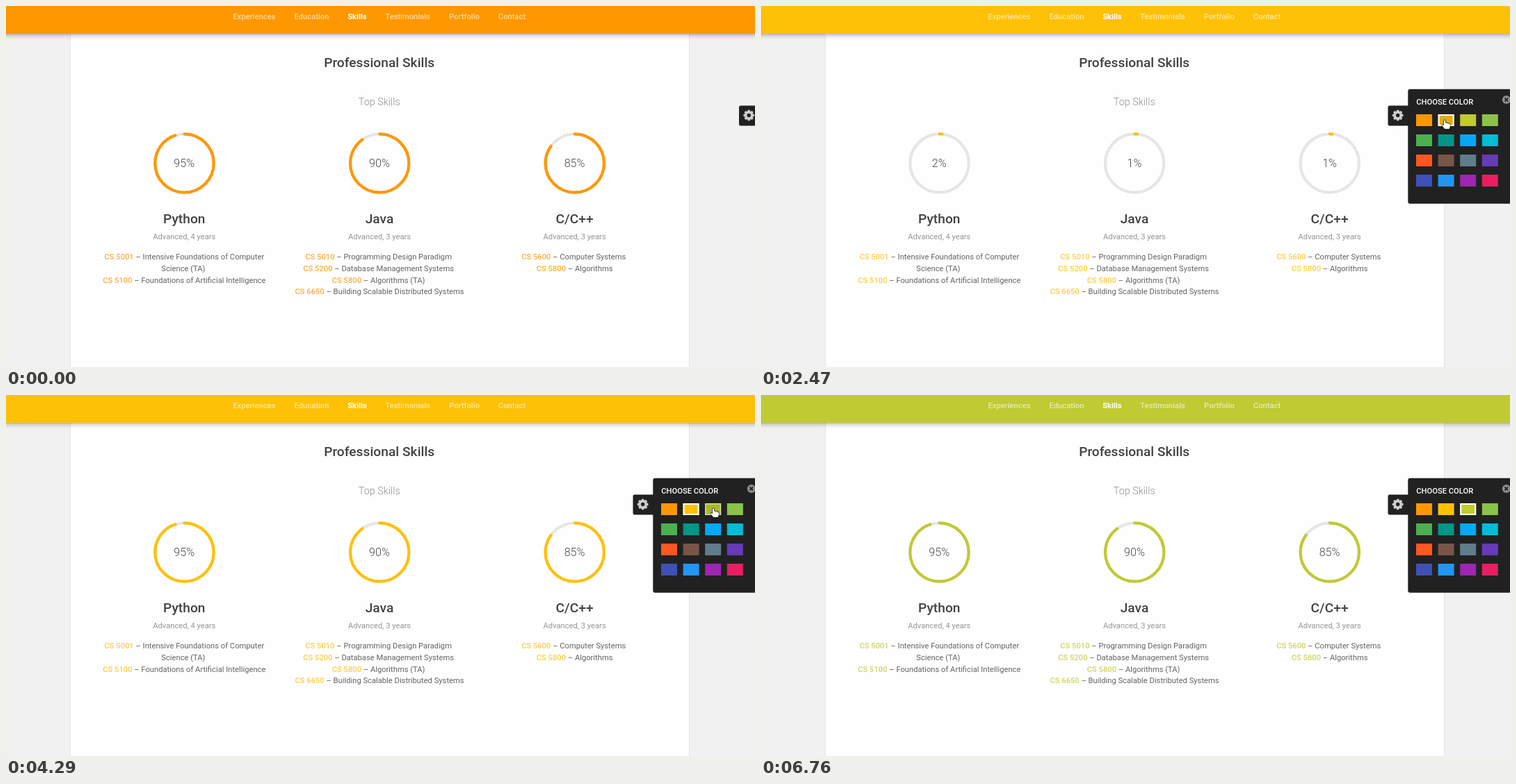
An HTML page with a canvas for the animation above (7.15 s loop, 1077 by 520 pixels).

```html
<!DOCTYPE html>
<html lang="en">
<head>
<meta charset="utf-8">
<title>Professional Skills</title>
<style>
  html, body { margin: 0; width: 100%; height: 100%; overflow: hidden; background: #f1f1f1; }
  canvas { display: block; width: 1077px; height: 520px; }
</style>
</head>
<body>
<canvas id="stage"></canvas>
<script>
const W = 1077, H = 520, LOOP = 7150, STEP = 130;
const canvas = document.getElementById('stage');
const ctx = canvas.getContext('2d');
const dpr = window.devicePixelRatio || 1;
canvas.width = W * dpr;
canvas.height = H * dpr;

const COLORS = [
  '#ff9800', '#ffc107', '#c0ca33', '#8bc34a',
  '#4caf50', '#009688', '#03a9f4', '#00bcd4',
  '#ff5722', '#795548', '#607d8b', '#673ab7',
  '#3f51b5', '#2196f3', '#9c27b0', '#e91e63'
];

const NAV = [
  ['Experiences', 357], ['Education', 439.5], ['Skills', 505],
  ['Testimonials', 577.5], ['Portfolio', 659], ['Contact', 727.5]
];

// Trailing spaces count towards the centred width of a line.
const SKILLS = [
  { x: 256.3, name: 'Python', years: 4, level: 95, lines: [
    ['CS 5001', ' – Intensive Foundations of Computer'],
    ['', 'Science (TA) '],
    ['CS 5100', ' – Foundations of Artificial Intelligence']] },
  { x: 537, name: 'Java', years: 3, level: 90, lines: [
    ['CS 5010', ' – Programming Design Paradigm '],
    ['CS 5200', ' – Database Management Systems '],
    ['CS 5800', ' – Algorithms (TA) '],
    ['CS 6650', ' – Building Scalable Distributed Systems']] },
  { x: 817.6, name: 'C/C++', years: 3, level: 85, lines: [
    ['CS 5600', ' – Computer Systems '],
    ['CS 5800', ' – Algorithms']] }
];

const PICKS = [{ at: 2290, index: 1 }, { at: 4696, index: 2 }];
const COUNT_MS = 2000;
const HOVERS = [{ index: 1, from: 1850, to: 2900 }, { index: 2, from: 3050, to: 6300 }];

// Pointer tip: time, x, y
const POINTER = [
  [910, 1092, 190], [1040, 1066, 156], [1430, 1066, 156], [1820, 983, 164],
  [2860, 983, 164], [2990, 1005, 163], [3120, 1017, 163], [6240, 1017, 163], [6630, 1092, 215]
];

const clamp = v => Math.max(0, Math.min(1, v));
const swing = x => 0.5 - Math.cos(Math.PI * clamp(x)) / 2;
const easeInOutQuad = x => x < 0.5 ? 2 * x * x : 1 - 2 * (1 - x) * (1 - x);
const font = (weight, size) => `${weight} ${size}px Roboto, sans-serif`;

function text(str, x, y, weight, size, color, align = 'center') {
  ctx.font = font(weight, size);
  ctx.fillStyle = color;
  ctx.textAlign = align;
  ctx.fillText(str, x, y);
}

function rect(x, y, w, h, color) {
  ctx.fillStyle = color;
  ctx.fillRect(x, y, w, h);
}

function roundLeft(x, y, w, h, r, color) {
  ctx.beginPath();
  ctx.moveTo(x + w, y);
  ctx.arcTo(x, y, x, y + h, r);
  ctx.arcTo(x, y + h, x + w, y + h, r);
  ctx.lineTo(x + w, y + h);
  ctx.fillStyle = color;
  ctx.fill();
}

function arc(x, y, r, share, width, color, cap) {
  const top = -Math.PI / 2;
  ctx.beginPath();
  ctx.arc(x, y, r, top, top + share * 2 * Math.PI);
  ctx.lineWidth = width;
  ctx.lineCap = cap;
  ctx.strokeStyle = color;
  ctx.stroke();
}

function page() {
  rect(0, 0, W, H, '#f1f1f1');
  rect(92, 0, 891, H, '#e3e3e3');
  rect(93, 0, 889, H, '#fefefe');
  text('Professional Skills', 536.7, 88.4, 500, 19.2, '#424242');
  text('Top Skills', 536.8, 143, 300, 14.4, '#8f8f8f');
}

function header(color) {
  const shade = ctx.createLinearGradient(0, 40, 0, 48);
  shade.addColorStop(0, 'rgba(0,0,0,.26)');
  shade.addColorStop(0.4, 'rgba(0,0,0,.1)');
  shade.addColorStop(1, 'rgba(0,0,0,0)');
  rect(0, 40, W, 8, shade);
  rect(0, 0, W, 40, color);
  for (const [label, x] of NAV) {
    const active = label === 'Skills';
    text(label, x, 19.3, active ? 700 : 500, 11.2, active ? '#fff' : 'rgba(255,255,255,.62)');
  }
}

function skill(s, color, progress) {
  const y = 226.5, value = s.level * progress;
  arc(s.x + 0.2, y, 42.2, 1, 4.2, '#e6e6e5', 'butt');
  if (value > 0) arc(s.x + 0.2, y, 42.2, value / 100, 4.2, color, 'round');
  text(Math.round(value) + '%', s.x, 232.4, 300, 16.2, '#4a4a4a');
  text(s.name, s.x, 312.8, 500, 19.2, '#424242');
  text(`Advanced, ${s.years} years`, s.x, 336, 400, 11.2, '#949494');

  s.lines.forEach(([code, title], i) => {
    const lineY = 365 + i * 16.8;
    ctx.font = font(500, 11.2);
    const codeW = ctx.measureText(code).width;
    ctx.font = font(400, 11.2);
    const x = s.x - (codeW + ctx.measureText(title).width) / 2;
    ctx.globalAlpha = 0.78;
    text(code, x, lineY, 500, 11.2, color, 'left');
    ctx.globalAlpha = 1;
    text(title, x + codeW, lineY, 400, 11.2, '#636363', 'left');
  });
}

function gear(x, y, color, back) {
  ctx.save();
  ctx.translate(x, y);
  ctx.fillStyle = color;
  for (let i = 0; i < 8; i++) {
    ctx.beginPath();
    ctx.moveTo(-2.3, -5);
    ctx.lineTo(-1.5, -7.8);
    ctx.lineTo(1.5, -7.8);
    ctx.lineTo(2.3, -5);
    ctx.fill();
    ctx.rotate(Math.PI / 4);
  }
  ctx.beginPath();
  ctx.arc(0, 0, 6, 0, 2 * Math.PI);
  ctx.fill();
  ctx.beginPath();
  ctx.arc(0, 0, 2.7, 0, 2 * Math.PI);
  ctx.fillStyle = back;
  ctx.fill();
  ctx.restore();
}

function closeIcon(x, y) {
  ctx.beginPath();
  ctx.arc(x, y, 6, 0, 2 * Math.PI);
  ctx.fillStyle = '#8e8e8e';
  ctx.fill();
  ctx.beginPath();
  for (const d of [-1, 1]) {
    ctx.moveTo(x - 2.3, y - 2.3 * d);
    ctx.lineTo(x + 2.3, y + 2.3 * d);
  }
  ctx.lineWidth = 1.8;
  ctx.lineCap = 'butt';
  ctx.strokeStyle = '#212121';
  ctx.stroke();
}

function hoverAmount(index, t) {
  const h = HOVERS.find(o => o.index === index);
  return h ? clamp((t - h.from) / 400) * (1 - clamp((t - h.to) / 300)) : 0;
}

function swatch(i, t, selected) {
  const x = 942 + (i % 4) * 31.6, y = 156 + Math.floor(i / 4) * 29;
  const hover = hoverAmount(i, t);
  ctx.globalAlpha = 1 - 0.12 * hover;
  rect(x, y, 23, 17, COLORS[i]);
  ctx.globalAlpha = selected ? 1 : 0.6 * hover;
  ctx.lineWidth = selected ? 2 : 1.4;
  const inset = ctx.lineWidth / 2;
  ctx.strokeStyle = '#fff';
  ctx.strokeRect(x + inset, y + inset, 23 - 2 * inset, 17 - 2 * inset);
  ctx.globalAlpha = 1;
}

function panel(t, picked) {
  const pressed = t >= 1040 && t < 1690;
  const back = pressed ? '#050505' : '#212121';
  ctx.save();
  ctx.translate(152.5 * (1 - swing((t - 1164) / 400)), 0);
  roundLeft(901.5, 143.5, 30, 29, 2.5, back);
  gear(915.7, 157.5, pressed ? '#fff' : '#cfcfcf', back);
  roundLeft(930.3, 119.7, 160, 165, 3, '#212121');
  text('CHOOSE COLOR', 942.2, 142.4, 500, 11.2, '#fff', 'left');
  closeIcon(1071.8, 135);
  COLORS.forEach((_, i) => swatch(i, t, i === picked));
  ctx.restore();
}

const ARROW = 'M0 0V11.5L2.7 9.1L4.5 13L6.4 12.1L4.7 8.3H8.2Z';
const HAND = 'M-1 1Q0 -.7 1.2 1V4.6Q2.6 3.7 3.6 5Q5 4.2 5.8 5.6Q7.6 5 7.8 6.8V9.4L6.6 13H.2L-3.6 8.4Q-4 6.6-2.3 7L-1 8.2Z';

function pointer(t) {
  const next = POINTER.findIndex(p => p[0] > t);
  if (next < 1) return;
  const [t0, x0, y0] = POINTER[next - 1], [t1, x1, y1] = POINTER[next];
  const k = swing((t - t0) / (t1 - t0));
  const arrow = (t > 2860 && t < 3120) || t > 6240;
  const shape = new Path2D(arrow ? ARROW : HAND);
  ctx.save();
  ctx.translate(x0 + (x1 - x0) * k, y0 + (y1 - y0) * k);
  ctx.lineJoin = 'round';
  ctx.lineWidth = arrow ? 1.6 : 1.2;
  ctx.strokeStyle = arrow ? '#fff' : '#111';
  ctx.fillStyle = arrow ? '#111' : '#fff';
  ctx.stroke(shape);
  ctx.fill(shape);
  ctx.restore();
}

function draw(now) {
  const t = Math.floor((now % LOOP) / STEP) * STEP;
  const pick = PICKS.filter(p => t >= p.at).pop();
  const index = pick ? pick.index : 0;
  const progress = pick ? easeInOutQuad(clamp((t - pick.at) / COUNT_MS)) : 1;

  ctx.setTransform(dpr, 0, 0, dpr, 0, 0);
  page();
  header(COLORS[index]);
  for (const s of SKILLS) skill(s, COLORS[index], progress);
  panel(t, index);
  pointer(t);
}

const start = performance.now();
function tick() {
  draw(performance.now() - start);
  requestAnimationFrame(tick);
}
tick();
</script>
</body>
</html>
```
